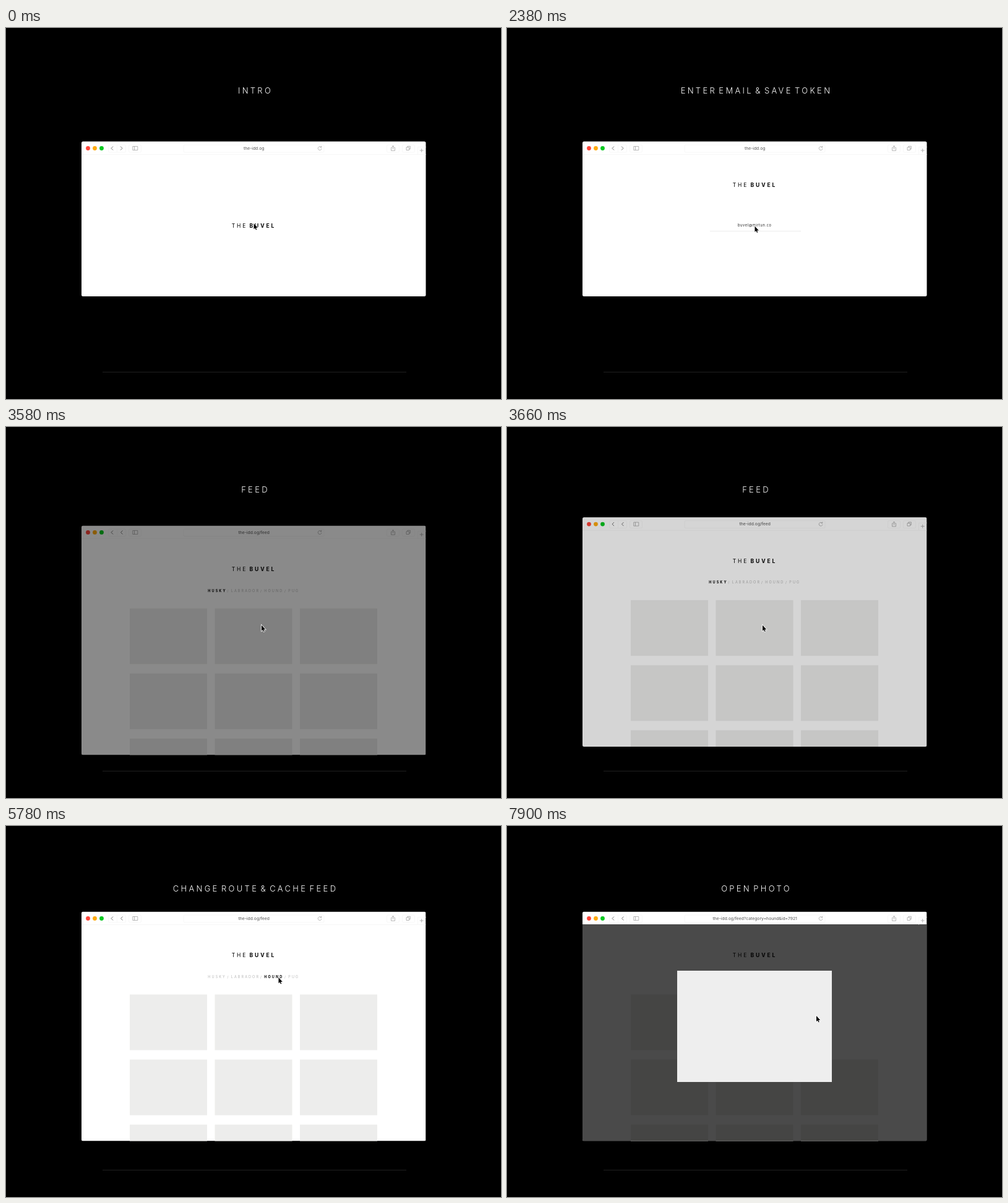
An HTML page that plays this animation: 800x600 px, repeating every 8 s.

```html
<!DOCTYPE html>
<html lang="en">
<head>
<meta charset="utf-8">
<title>Feed walkthrough</title>
<style>
  html, body { margin: 0; width: 100%; height: 100%; overflow: hidden; background: #000; }
  svg { display: block; width: 800px; height: 600px; }
  text { font-family: Inter, "Liberation Sans", sans-serif; white-space: pre; }
  #title { font-size: 13px; font-weight: 300; letter-spacing: 3.3px; word-spacing: -3.6px; fill: #fff; }
  .logo { font-size: 8.5px; letter-spacing: 2.9px; }
  .logo .b { font-weight: 700; }
  .url { font-size: 6.7px; font-weight: 500; fill: #6c6c6c; }
  .mail { font-size: 5.6px; letter-spacing: .65px; fill: #222; }
  .menu { font-size: 5.5px; letter-spacing: 2.1px; fill: #b6b6b6; }
  .menu .on { font-weight: 700; fill: #000; }
  .icon { fill: none; stroke: #9a9a9a; stroke-width: .7; }
  .arrow { fill: none; stroke: #777; stroke-width: 1; }
  .edge { fill: none; stroke: #f7f7f7; stroke-width: 1; }
</style>
</head>
<body>
<svg viewBox="0 0 800 600">
  <defs>
    <clipPath id="page"><rect x="122" y="138.5" width="556.5" height="371" rx="2.5"/></clipPath>
    <g id="chrome">
      <g class="edge">
        <rect x="165.5" y="5.5" width="28" height="12" rx="2"/>
        <path d="M179.500 5.500v12"/>
        <rect x="198.5" y="5.5" width="20" height="12" rx="2"/>
        <rect x="287" y="5.5" width="227" height="12" rx="2"/>
        <rect x="615.5" y="5.5" width="20" height="12" rx="2"/>
        <rect x="640.5" y="5.5" width="20" height="12" rx="2"/>
        <path d="M665.5 21v-12h13"/>
      </g>
      <circle cx="132.5" cy="11" r="3.4" fill="#ff453a"/>
      <circle cx="143.5" cy="11" r="3.4" fill="#ffab0f"/>
      <circle cx="154.5" cy="11" r="3.4" fill="#06c81f"/>
      <path class="arrow" d="M173 8l-3 3 3 3"/>
      <g class="icon">
        <path d="M204.8 8h8v6h-8zM207.5 8v6"/>
        <path d="M509.3 9.2a2.9 2.9 0 1 0 .7 2.3M509.8 7.3v2.2h-2.2"/>
        <path d="M624.3 9.8h-1.8v5h6v-5h-1.8M625.5 12.5v-5.5M624 8.4l1.5-1.5 1.5 1.5"/>
        <path d="M647 9.5h4.5v4.5h-4.5zM648.8 9.5v-1.7h4.5v4.5h-1.8"/>
        <path d="M668.7 14.5h6M671.7 11.5v6"/>
      </g>
    </g>
    <g id="brand" class="logo">
      <text x="364.7" y="0">THE</text>
      <text x="393.5" y="0" class="b">BUVEL</text>
    </g>
  </defs>

  <rect width="800" height="600"/>
  <rect x="156" y="556" width="491" height="1" fill="#202020"/>
  <text id="title" x="403" y="106.3" text-anchor="middle"></text>

  <g id="login">
    <rect x="122" y="183.5" width="556.5" height="250.5" rx="2.5" fill="#fff"/>
    <path class="edge" d="M122 204.5h556.5"/>
    <g transform="translate(0 183.5)">
      <use href="#chrome"/>
      <path class="arrow" d="M185 8l3 3-3 3"/>
      <text class="url" x="400.7" y="13.4" text-anchor="middle">the-idd.og</text>
    </g>
    <use href="#brand" id="mark"/>
    <g id="field">
      <path d="M328 328.5h147" stroke="#ebebeb"/>
      <text class="mail" id="mail" x="400.3" y="321.3" text-anchor="middle"></text>
    </g>
  </g>

  <g id="feed">
    <g clip-path="url(#page)">
      <rect x="122" y="138.5" width="556.5" height="371" fill="#fff"/>
      <path class="edge" id="rule" d="M122 159.5h556.5"/>
      <use href="#brand" y="212.3"/>
      <g class="menu" id="menu"></g>
      <g id="cards" fill="#ededec"></g>
      <rect id="shade" x="122" y="159" width="556.5" height="351" opacity=".71"/>
    </g>
    <g id="bar" transform="translate(0 138.5)">
      <use href="#chrome"/>
      <path class="arrow" d="M188.5 8l-3 3 3 3"/>
      <text class="url" id="url" x="400.7" y="13.4" text-anchor="middle"></text>
    </g>
    <rect id="photo" fill="#eee"/>
  </g>

  <path id="mouse" d="M0 0V9.2L2 7.4 3.5 10.6 4.8 10 3.4 6.9H6.3Z"
        fill="#000" stroke="#fff" stroke-width="1.5" paint-order="stroke"/>
</svg>
<script>
const LOOP = 8000, FADE = 360;
const MOVE_LOGO = 636, TYPE = 2380, FEED = 3499, ROUTE = 5780, OPEN = 7557;

// [start, title]
const TITLES = [
  [0, 'INTRO'], [MOVE_LOGO, 'LOGIN'], [TYPE, 'ENTER EMAIL & SAVE TOKEN'],
  [FEED, 'FEED'], [ROUTE, 'CHANGE ROUTE & CACHE FEED'], [OPEN, 'OPEN PHOTO']
];
// [start, end, x, y]
const MOUSE = [
  [0, 0, 400.5, 316], [1720, 1960, 400.5, 320.5], [2940, 3160, 413, 320.5],
  [3670, 3840, 413, 255], [4560, 5240, 440.5, 245],
  [6460, 6620, 437.5, 255], [6760, 7060, 500, 307]
];
const LINKS = [[326.3, 'HUSKY'], [357.5, '/'], [363.7, 'LABRADOR'], [411, '/'],
  [417.3, 'HOUND'], [450, '/'], [456.3, 'PUG']];
const THUMB = { x: 475, y: 272.5, width: 125, height: 90 };
const LARGE = { x: 275, y: 234, width: 250, height: 180 };

const $ = id => document.getElementById(id);
const set = (el, attrs) => { for (const k in attrs) el.setAttribute(k, attrs[k]); };
const show = (el, on) => set(el, { visibility: on ? 'visible' : 'hidden' });
const write = (el, s) => { if (el.textContent !== s) el.textContent = s; };
const lerp = (a, b, p) => a + (b - a) * p;
const part = (t, start, length) => Math.min(1, Math.max(0, (t - start) / length));
const easeOut = p => 1 - (1 - p) ** 3;
const easeInOut = p => p * p * (3 - 2 * p);

function add(parent, tag, attrs) {
  const el = document.createElementNS('http://www.w3.org/2000/svg', tag);
  set(el, attrs);
  return parent.appendChild(el);
}

const links = LINKS.map(([x, label]) => {
  const el = add($('menu'), 'text', { x, y: 245.6 });
  el.textContent = label;
  return el;
});
const cards = [];
for (let i = 0; i < 9; i++) {
  cards.push(add($('cards'), 'rect', {
    x: 200 + i % 3 * 137.5, y: 272.5 + Math.floor(i / 3) * 105.2, width: 125, height: 90
  }));
}

function mouseAt(t) {
  let [, , x, y] = MOUSE[0];
  for (const [start, end, toX, toY] of MOUSE.slice(1)) {
    const p = easeInOut(part(t, start, end - start));
    x = lerp(x, toX, p);
    y = lerp(y, toY, p);
  }
  return [x, y];
}

function drawLogin(t) {
  const p = easeOut(part(t, MOVE_LOGO, 700));
  set($('mark'), { y: lerp(322.6, 257.3, p) });
  set($('field'), { opacity: p });
  const typed = t >= TYPE;
  write($('mail'), typed ? 'buvel@mirtun.co' : 'email');
  $('mail').style.fill = typed ? '#222' : '#b6b6b6';
}

function drawFeed(t) {
  const p = easeOut(part(t, FEED, FADE));
  set($('feed'), { opacity: p, transform: `translate(0 ${45.5 * (1 - p)})` });
  const active = t < ROUTE ? 'HUSKY' : 'HOUND';
  links.forEach((el, i) => el.classList.toggle('on', LINKS[i][1] === active));

  const open = t >= OPEN, q = easeOut(part(t, OPEN, FADE));
  show($('shade'), open);
  show($('photo'), open);
  show($('rule'), !open);
  show(cards[2], !open);
  set($('bar'), { opacity: open ? q : 1 });
  write($('url'), 'the-idd.og/feed' + (open ? '?category=hound&id=7921' : ''));
  for (const k in THUMB) $('photo').setAttribute(k, lerp(THUMB[k], LARGE[k], q));
}

function draw(t) {
  const inFeed = t >= FEED;
  $('login').style.display = inFeed ? 'none' : '';
  $('feed').style.display = inFeed ? '' : 'none';
  write($('title'), TITLES.filter(([start]) => start <= t).pop()[1]);
  if (inFeed) drawFeed(t); else drawLogin(t);
  set($('mouse'), { transform: `translate(${mouseAt(t)})` });
}

const began = performance.now();
function tick() {
  draw((performance.now() - began) % LOOP);
  requestAnimationFrame(tick);
}
tick();
</script>
</body>
</html>
```
